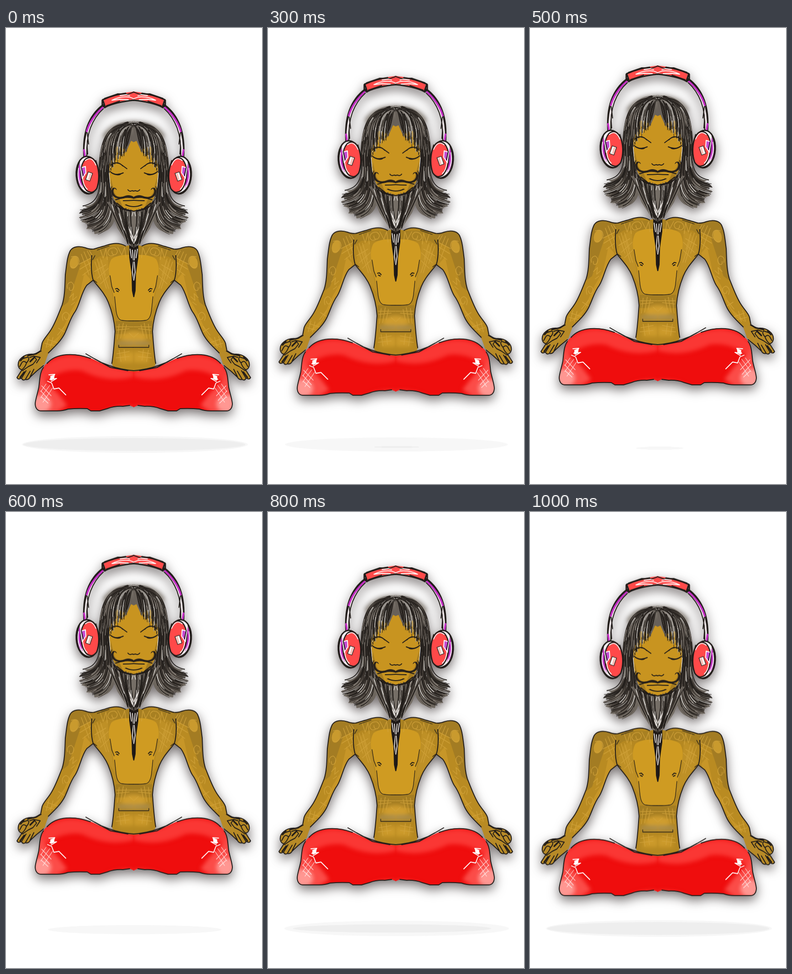
Animation of 561x998 px, one loop 1.1 s. Source, as an HTML page:

```html
<!DOCTYPE html>
<html lang="en">
<head>
<meta charset="utf-8">
<title>Floating meditation</title>
<style>
html, body { margin: 0; width: 100%; height: 100%; overflow: hidden; background: #fff; }
svg { display: block; width: 561px; height: 998px; }
path, line { stroke-linecap: round; stroke-linejoin: round; }
.ink { fill: none; stroke: #211c19; stroke-width: 2; }
.thin { stroke-width: 1.3; }
.bold { stroke-width: 3.2; }
.tattoo { fill: none; stroke: #d3a43c; stroke-width: 1.5; opacity: .8; }
.white { fill: none; stroke: #fff; stroke-width: 1.8; }
.soft { filter: blur(5px); }
.shade { filter: drop-shadow(0 9px 12px rgba(45, 36, 36, .66)); }

.float { animation: float 1.1s infinite; }
@keyframes float {
  0% { transform: translateY(0); animation-timing-function: steps(5); }
  45.45% { transform: translateY(-57px); animation-timing-function: steps(5); }
  90.9% { transform: translateY(1.5px); animation-timing-function: step-end; }
  100% { transform: translateY(1.5px); }
}

/* unit circles scaled into the two tones of the ground shadow */
.outer { fill: #f7f7f7; animation: outer 1.1s step-end infinite; }
.inner { fill: #eee; animation: inner 1.1s step-end infinite; }
@keyframes outer {
  0%, 90.9%, 100% { transform: translate(282.5px, 911.5px) scale(247.5, 18.5); }
  18.18% { transform: translate(282px, 911.5px) scale(246, 17); }
  27.27% { transform: translate(281.5px, 911.5px) scale(244, 15.5); }
  36.36% { transform: translate(282px, 914px) scale(190, 10); }
  45.45% { transform: translate(284px, 919.5px) scale(52, 3.5); }
  54.54% { transform: translate(282px, 914px) scale(190, 10); }
  63.63% { transform: translate(281.5px, 911.5px) scale(244, 15.5); }
  72.72% { transform: translate(282px, 911.5px) scale(246, 17); }
  81.81% { transform: translate(282.5px, 911.5px) scale(247, 18); }
}
@keyframes inner {
  0%, 90.9%, 100% { transform: translate(281px, 911.5px) scale(243, 14); }
  9.09% { transform: translate(280px, 912px) scale(233, 12); }
  18.18% { transform: translate(279px, 913px) scale(180, 8); }
  27.27% { transform: translate(282px, 917px) scale(50, 2); }
  36.36%, 45.45%, 54.54% { transform: translate(282px, 917px) scale(0, 0); }
  63.63% { transform: translate(283px, 919px) scale(45, 1.5); }
  72.72% { transform: translate(272px, 911.5px) scale(217, 9); }
  81.81% { transform: translate(279px, 911.5px) scale(236, 12.5); }
}
</style>
</head>
<body>
<svg viewBox="0 0 561 998">
  <defs>
    <path id="armShape" d="M212 479C196 484 184 484 174 481C162 477 148 477 141 487C134 500 133 518 130 540C129 565 129 588 123 606C115 626 109 643 100 658C92 672 82 680 79 690L76 706L64 714L84 737L92 712C104 700 119 687 128 670C138 650 140 636 152 620C162 604 165 579 177 563L191 552L215 520Z"/>
    <path id="torsoShape" d="M281 474L262 477C250 470 236 470 222 475C210 479 200 481 192 485L188 502C186 520 187 538 191 552C202 567 216 580 224 600C233 622 238 645 239 664C237 688 236 710 232 735L240 752H281Z"/>
    <path id="pantsShape" d="M281 752C250 749 224 741 205 732C182 720 158 712 132 715C108 717 92 729 82 743C74 754 74 770 72 786C69 801 64 815 64 823Q65 837 76 838L112 838Q125 838 136 834Q155 832 178 833L186 838H205L222 833Q238 827 256 828L271 826L281 830Z"/>
    <clipPath id="armClip"><use href="#armShape"/></clipPath>
    <clipPath id="torsoClip"><use href="#torsoShape"/></clipPath>
    <clipPath id="pantsClip"><use href="#pantsShape"/></clipPath>

    <g id="half">
      <!-- arm -->
      <use href="#armShape" fill="#b98b22"/>
      <g clip-path="url(#armClip)">
        <path d="M205 478L140 478L128 550L120 612L136 600L152 552L164 515L190 500Z" fill="#a37c23"/>
        <path d="M172 535L160 590L142 620L118 672L88 700L110 690L140 640L165 600L185 550Z" fill="#c79628"/>
        <ellipse cx="149" cy="513" rx="9" ry="14" fill="#c99a2e" transform="rotate(15 149 513)"/>
      </g>
      <g class="tattoo">
        <path d="M143 501Q160 495 160 512Q153 530 142 522M135 570Q132 558 143 556Q152 562 146 573Q138 578 139 568M139 590L148 581L146 596L155 588M143 606L151 600M125 640Q120 626 131 622Q141 625 137 636Q130 642 128 632M115 657L129 666M128 653L113 672M90 681L114 689M85 690L108 696M94 675L88 699M103 677L97 700"/>
        <path d="M165 495L182 540M171 490L188 530M178 488L196 522M160 517L193 500M162 528L190 511M168 541L188 526M183 488L204 521"/>
      </g>

      <!-- torso -->
      <use href="#torsoShape" fill="#b58821"/>
      <g clip-path="url(#torsoClip)">
        <path d="M185 478H281V500H205L186 512Z" fill="#a88022"/>
        <path d="M281 497Q245 494 231 506Q222 522 227 545L235 584L241 625Q245 639 252 641H281Z" fill="#cf9b22"/>
        <path d="M192 545L205 510L223 500L226 548L239 615L221 590Z" fill="#be9026"/>
        <path d="M281 641H240V670H281Z" fill="#a47d22"/>
        <ellipse class="soft" cx="279" cy="678" rx="27" ry="15" fill="#cf9d30"/>
        <path class="soft" d="M281 708L252 711L246 732H281Z" fill="#cc9a2b"/>
        <path class="soft" d="M247 690H281" stroke="#a58b54" stroke-width="8"/>
      </g>
      <g class="tattoo">
        <path d="M238 496Q226 503 223 492Q225 480 238 481Q249 488 240 496Q232 498 232 489M245 480L254 497L260 480L263 503M206 483L213 504L219 483L222 507M207 505L218 541M195 512L208 550M200 506L220 570M194 533L219 518M200 548L224 526M207 560L225 543M210 525L225 570"/>
        <path d="M242 654H280M243 661L270 658M248 648L244 681M257 646L251 679M264 650L259 673M270 668L280 677M243 713L270 708M241 722L270 719M248 705L252 730M259 704L262 727"/>
      </g>
      <path class="ink" d="M262 477C250 470 236 470 222 475C210 479 200 481 192 484M188 498C186 520 187 538 191 552C202 567 216 580 224 600C233 622 238 645 239 664C237 688 236 710 232 734"/>
      <path class="ink thin" d="M228 542L232 566L237 579M238 588L241 617Q243 635 251 639Q258 641 281 641M247 694V699H281M200 486L226 477M190 507L195 498M191 551L199 557"/>
      <path class="ink" d="M240 571L244 570L248 574M242 575L246 577"/>
      <path class="ink" d="M190 484Q181 484 174 481C162 477 148 477 141 487C134 500 133 518 130 540C129 565 129 588 123 606C115 626 109 643 100 658C92 672 82 680 79 690L76 706L67 713M191 552L177 563C165 579 162 604 152 620C140 636 138 650 128 670C119 687 104 700 92 712L88 719"/>

      <!-- pants -->
      <use href="#pantsShape" fill="#ef0d0d"/>
      <g clip-path="url(#pantsClip)">
        <path class="soft" d="M70 750Q120 695 200 728Q240 745 281 750V763Q225 779 166 750Q115 743 76 783Z" fill="#fa3734"/>
        <path class="soft" d="M72 745L83 770L114 800L134 826L110 842H58Z" fill="#fb4c48"/>
        <ellipse class="soft" cx="74" cy="823" rx="25" ry="20" fill="#ff9792"/>
        <path class="soft" d="M210 843Q245 822 281 828V845Z" fill="#fb302c"/>
      </g>
      <path class="ink" d="M82 743C74 754 74 770 72 786C69 801 64 815 64 823Q65 837 76 838L112 838Q125 838 136 834Q155 832 178 833L186 838H205L222 833Q238 827 256 828L271 826M90 734Q105 717 132 715Q158 713 185 723M175 713L206 731L227 739Q252 748 281 750M194 724L229 743L267 750"/>
      <path class="white" d="M91 773L100 777L105 790L116 788L131 803M94 759L107 758L96 769L111 767L99 774"/>
      <path d="M97 762L107 758L105 769L98 772Z" fill="#fff"/>
      <path class="white" d="M78 783L99 805M76 794L95 815M78 808L92 821M102 788L81 819M96 782L76 809M88 779L76 796" style="stroke-width:1.2;opacity:.75"/>

      <!-- hand -->
      <path d="M78 705L62 714Q45 712 35 721Q25 729 27 740Q30 746 34 748L24 765Q27 771 34 766Q36 773 43 769Q49 771 53 764L67 751L84 735L93 712Z" fill="#b78a27"/>
      <path class="ink" d="M77 707L62 714Q45 712 35 721Q25 729 27 740Q29 747 35 748L24 765Q27 771 34 766Q36 773 43 769Q49 771 53 764L67 751L82 739M35 748Q42 742 45 733Q39 727 35 732L30 741M45 733Q53 724 48 720L36 724M35 765L44 750M43 768L53 751M53 763L61 747M52 721L61 718L67 726L59 736L49 741L36 750M60 718L75 721L67 733"/>
      <path class="ink bold" d="M48 717L66 713L74 708M32 728L39 720M31 765L40 753M53 730L62 721"/>

      <!-- hair, face, beard -->
      <path class="soft" d="M281 205Q231 204 212 236L226 251L281 230Z" fill="#8b847b"/>
      <path d="M281 207C228 206 204 240 203 310L206 350C206 374 192 389 172 390L184 397L163 404L178 411L165 424L181 429L176 440L192 440L194 451C223 447 232 437 237 422L250 440L269 476H281Z" fill="#6d665e"/>
      <g id="locks"></g>
      <path d="M281 242L244 252C228 272 225 300 228 330C229 364 240 391 261 397L281 402Z" fill="#c89420"/>
      <path d="M229 326C230 360 240 386 258 397L250 377L238 361Z" fill="#a67c20"/>
      <path d="M281 212V250L274 247L262 274L258 257L247 264L242 257L233 281L223 300L217 250Z" fill="#68615a"/>
      <g id="bangs"></g>
      <path d="M270 472L270 502L275 537L276 575L279 589H281V470Z" fill="#1e1917"/>
      <path d="M222 380L243 391L264 399L281 403V481L268 474L244 438Z" fill="#756e66"/>
      <g id="beard"></g>
      <path class="white" d="M280 461L270 440M280 471L273 455M277 486L279 508M279 512L277 534L280 552M272 484L275 503" style="stroke:#eee9e5"/>

      <path class="ink" d="M228 314Q240 325 257 317M231 317Q243 324 251 320M230 300Q241 292 250 297L265 308M233 297Q246 292 256 302M267 354Q271 359 276 356L281 357M263 387Q271 391 281 391M257 378Q270 378 281 377"/>
      <path class="ink thin" d="M232 347L228 357M246 264V286M239 267L240 289M234 275L232 305M261 387L270 390M231 372L242 388M237 379L254 396"/>
      <path d="M281 370Q271 364 262 367Q248 373 239 366Q232 358 238 351L243 355Q241 348 234 350Q227 358 235 368Q246 377 262 372Q271 371 281 374Z" fill="#28211b"/>
      <path class="ink" d="M240 376L258 371M247 391L263 397L281 401M243 383L257 394M236 381L250 395L272 401"/>

      <!-- headphones -->
      <path d="M174 284Q171 244 181 216Q192 187 214 171" fill="none" stroke="#211c19" stroke-width="9"/>
      <path d="M174 278Q173 244 183 216Q193 191 213 174" fill="none" stroke="#e8e1e2" stroke-width="4"/>
      <path d="M177 226Q185 198 212 174M171 267L173 280" fill="none" stroke="#c42fc5" stroke-width="4"/>
      <path class="ink" d="M179 276Q175 246 185 219Q195 193 213 177M181 254L178 229"/>
      <path d="M214 157Q246 142 281 139V156Q249 158 218 172Z" fill="#ff4b4a"/>
      <path class="ink bold" d="M217 172L212 157Q236 146 262 143M218 173Q240 162 281 158M211 158L211 170L217 174"/>
      <path class="ink" d="M216 154L245 144L267 145L281 140M220 170L249 160"/>
      <path class="white bold" d="M232 158Q250 149 270 151L281 155M233 158L249 156L268 157M250 148L264 146L271 148"/>

      <ellipse cx="179" cy="322" rx="25" ry="41" fill="#f5edf0" stroke="#211c19" stroke-width="3" transform="rotate(-4 179 322)"/>
      <path d="M162 296Q152 318 161 343L168 350L164 320Z" fill="#bd31be"/>
      <path d="M173 288Q190 275 200 301Q207 327 199 351Q190 365 177 356Q164 342 164 315Q165 297 173 288Z" fill="#ff4949" stroke="#211c19" stroke-width="2.6"/>
      <path class="white" d="M174 290Q188 279 197 300M168 327Q169 345 178 353M159 307Q155 330 166 347"/>
      <path d="M164 306L174 303L175 317L167 329Z" fill="#c44bd0" stroke="#fff" stroke-width="2"/>
      <path class="ink" d="M161 294Q151 320 160 344Q169 361 184 362M165 305L169 323M197 290L204 315"/>
      <rect x="177" y="316" width="10" height="18" fill="#fff4f0" stroke="#3a2522" stroke-width="1.5" transform="rotate(19 182 325)"/>
      <path d="M182 331L185 320" stroke="#ffb6ac" stroke-width="3"/>
    </g>
  </defs>

  <circle class="outer" r="1"/>
  <circle class="inner" r="1"/>
  <g class="float">
    <g class="shade">
      <use href="#half"/>
      <use href="#half" transform="translate(560 0) scale(-1 1)"/>
    </g>
  </g>
</svg>
<script>
let seed = 41;
const rand = () => (seed = seed * 16807 % 2147483647) / 2147483647;
const jitter = n => (rand() - 0.5) * n;
const mix = (a, b, u) => a + (b - a) * u;
const darks = ['#211d1a', '#211d1a', '#2d2824', '#453e38'];
const lights = ['#a39b92', '#eeebe6'];
const pick = list => list[Math.floor(rand() * list.length)];

// Blend each point of an outer and an inner guide into one strand.
function blend(outer, inner, u, wobble) {
  return outer.map((p, i) => [
    mix(p[0], inner[i][0], u) + jitter(wobble),
    mix(p[1], inner[i][1], u) + jitter(wobble)
  ]);
}

function strand(group, points) {
  const path = document.createElementNS('http://www.w3.org/2000/svg', 'path');
  const [start, ...rest] = points.map(p => p.map(n => n.toFixed(1)).join(' '));
  const light = rand() < 0.32;
  path.setAttribute('d', `M${start}C${rest.join(' ')}`);
  path.setAttribute('fill', 'none');
  path.setAttribute('stroke', pick(light ? lights : darks));
  path.setAttribute('stroke-width', (0.8 + rand() * (light ? 0.8 : 1.4)).toFixed(1));
  // Light hairs are short glints rather than whole strands.
  if (light) {
    path.setAttribute('stroke-dasharray', `${20 + rand() * 35} ${15 + rand() * 45}`);
    path.setAttribute('stroke-dashoffset', rand() * 90);
  }
  document.getElementById(group).append(path);
}

function fill(group, count, outer, inner, wobble, bend) {
  for (let i = 0; i < count; i++) {
    const u = (i + rand()) / count;
    const points = blend(outer, inner, u, wobble);
    if (bend) bend(points[points.length - 1], u);
    strand(group, points);
  }
}

fill('locks', 72,
  [[279, 208], [228, 206], [204, 240], [205, 310], [206, 362], [203, 386], [172, 392]],
  [[277, 222], [250, 226], [234, 255], [229, 320], [230, 375], [246, 434], [204, 449]],
  8, (tip, u) => { tip[0] -= 17 * Math.sin(Math.PI * u) + jitter(12); });
fill('bangs', 54,
  [[279, 212], [272, 222], [271, 240], [267, 260]],
  [[268, 208], [236, 211], [219, 250], [224, 305]],
  7, tip => { tip[1] += jitter(24); });
fill('beard', 50,
  [[223, 381], [236, 412], [250, 438], [266, 466]],
  [[277, 403], [270, 420], [275, 446], [280, 478]],
  8);
</script>
</body>
</html>
```
